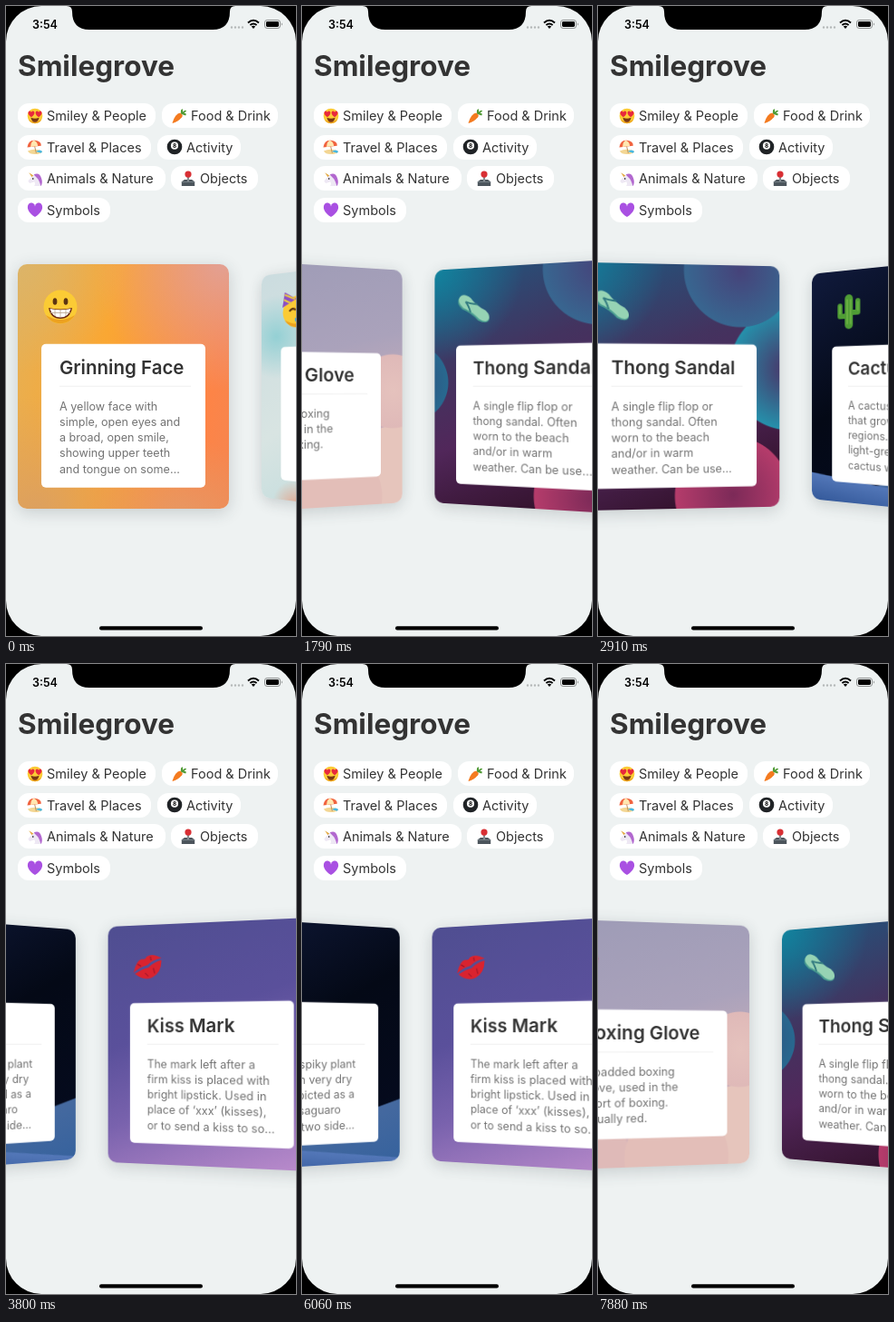
Write an HTML page that moves like this. It is 320 px wide and 693 px high and loops after 7990 ms.

```html
<!DOCTYPE html>
<html lang="en">
<head>
<meta charset="utf-8">
<title>Card carousel</title>
<style>
  html, body { margin: 0; width: 100%; height: 100%; overflow: hidden; background: #eef2f2; }
  body { position: relative; font-family: Inter, "Open Sans", sans-serif; color: #333; }
  h1 { position: absolute; left: 13px; top: 46.5px; margin: 0; font-size: 31.5px; line-height: 38px; font-weight: 700; }
  .chip { position: absolute; height: 27px; border-radius: 12px; background: #fff; font-size: 14.5px; line-height: 27px; white-space: nowrap; }
  .chip svg { position: absolute; left: 9.5px; top: 4.5px; width: 18px; height: 18px; }
  .chip span { position: absolute; left: 32px; }
  .card { position: absolute; left: 13px; top: 284px; width: 233px; height: 269px; border-radius: 10px; box-shadow: 0 4px 18px rgba(40, 55, 60, .2); }
  .card > svg { position: absolute; left: 27px; top: 27px; width: 40px; height: 40px; overflow: visible; }
  .box { position: absolute; left: 26px; top: 166.5px; width: 181px; min-height: 141px; transform: translateY(-50%);
    box-sizing: border-box; padding: 14px 16px 12px 20px; background: #fff; border-radius: 5px; }
  h2 { margin: 0; padding-bottom: 8px; border-bottom: 1px solid #efefef; font-size: 20.5px; line-height: 24px; font-weight: 600; white-space: nowrap; }
  p { margin: 13px 0 0; font-size: 12.6px; line-height: 17.3px; color: #737373; white-space: pre; }
  #phone { position: absolute; left: 0; top: 0; }
</style>
</head>
<body>
<h1>Smilegrove</h1>
<div id="chips"></div>
<div id="cards"></div>
<svg id="phone" width="320" height="693" viewBox="0 0 320 693">
  <path fill-rule="evenodd" d="M0 0H320V693H0Z M39 0H67Q73 0 73 6Q73 26 92 26H228Q247 26 247 6Q247 0 253 0H281A39 39 0 0 1 320 39V654A39 39 0 0 1 281 693H39A39 39 0 0 1 0 654V39A39 39 0 0 1 39 0Z"/>
  <text x="29" y="25" font-size="12.5" font-weight="600">3:54</text>
  <path d="M249 23.5H263" stroke="#b4b8b8" stroke-width="2.4" stroke-linecap="round" stroke-dasharray="0 4"/>
  <path d="M267 18.5Q273 13 279 18.5M269.4 21Q273 18 276.6 21" fill="none" stroke="#000" stroke-width="2"/>
  <path d="M270.8 22.6Q273 20.8 275.2 22.6L273 25Z"/>
  <rect x="285.5" y="15.5" width="17" height="9" rx="2.6" fill="none" stroke="#8d9090"/>
  <rect x="287" y="17" width="14" height="6" rx="1.4"/>
  <path d="M304 18.5Q306 20 304 21.5Z" fill="#8d9090"/>
  <rect x="103" y="682.3" width="114" height="4.2" rx="2.1"/>
</svg>
<script>
const face = '<circle cx="20" cy="20" r="18.5" fill="#fbcb35"/><path d="M4 29A18.5 18.5 0 0 0 36 29Q20 39 4 29" fill="#eda21f"/>';
const heart = (x, y, s, color) =>
  `<path transform="translate(${x} ${y}) scale(${s})" fill="${color}" d="M0 9C-14 0-9-10-3-8Q0-7 0-4Q0-7 3-8C9-10 14 0 0 9"/>`;

const art = {
  love: face + heart(11, 15, .85, '#e8283c') + heart(29, 15, .85, '#e8283c') + '<path d="M10 24Q20 28 30 24Q28 35 20 35T10 24" fill="#7a3713"/>',
  carrot: '<path d="M3 38Q10 14 23 12Q31 17 27 23Q18 34 3 38" fill="#f47b20"/><path d="M25 15Q22 4 29 3L29 10Q36 3 38 8L32 13Q40 13 36 19Z" fill="#4f9a35"/>',
  beach: '<path d="M2 30Q20 22 38 31Q34 38 20 38T2 30" fill="#f3d693"/><path d="M23 35L17 9" stroke="#b98954" stroke-width="2"/><path d="M1 21Q4 2 20 4T35 17Z" fill="#f0633f"/><path d="M9 20Q10 7 17 4Q26 7 27 18Z" fill="#ffe7b0"/><path d="M22 31Q32 24 38 31L35 35Z" fill="#45b8e4"/>',
  ball: '<circle cx="20" cy="20" r="18.5" fill="#202326"/><circle cx="20" cy="17" r="9" fill="#fff"/><text x="20" y="22" font-size="14" font-weight="700" text-anchor="middle">8</text>',
  unicorn: '<path d="M5 5L17 13L13 17Z" fill="#e2a63a"/><path d="M15 13Q26 6 33 18Q37 27 36 38H18Q22 31 18 27L8 31Q2 28 4 24Z" fill="#eee8f4"/><path d="M17 10Q31 3 36 20Q40 31 34 38Q31 23 24 17Z" fill="#b268cf"/><circle cx="15" cy="20" r="1.8"/>',
  joystick: '<path d="M4 27L11 22H29L36 27V38H4Z" fill="#4c555c"/><path d="M20 27V12" stroke="#858d92" stroke-width="5"/><circle cx="20" cy="9" r="8" fill="#d82f34"/><path d="M4 28H36" stroke="#7b858b" stroke-width="2"/>',
  symbol: heart(20, 20, 2, '#a950e2'),
  grin: face + '<ellipse cx="14" cy="14" rx="2.4" ry="3.8" fill="#5c3512"/><ellipse cx="26" cy="14" rx="2.4" ry="3.8" fill="#5c3512"/><path d="M7 21Q20 24 33 21Q31 33 20 33T7 21" fill="#6b2a15"/><path d="M8.5 22Q20 24.5 31.5 22Q29 31.5 20 31.5T8.5 22" fill="#fff"/><path d="M9 26.5H31M14 23V30M20 23V31M26 23V30" stroke="#b9a48f" stroke-width=".8"/>',
  party: face + '<path d="M1 14L4-4L19 5Z" fill="#8d4fc4"/><path d="M3 5L13 10M4-1L17 5" stroke="#e7c746" stroke-width="2"/><path d="M10 19Q14 14 18 18M24 16Q28 12 31 16" fill="none" stroke="#5c3512" stroke-width="2.4"/><path d="M17 27L37 32L35 37L17 31Z" fill="#48a9d8"/>',
  glove: '<path d="M9 25Q-2 12 11 4Q27-3 35 9Q39 19 30 28L26 31L10 29Z" fill="#da2b34"/><path d="M19 10Q25 19 34 13" fill="none" stroke="#981824" stroke-width="2"/><path d="M10 28L28 31L26 38L9 35Z" fill="#ab1c2b"/>',
  sandal: '<g transform="rotate(38 20 20)"><path d="M-2 20Q-2 13 9 13Q20 16 32 14Q42 15 42 20T32 27Q20 25 9 28Q-2 27-2 20" fill="#4b9e91"/><path d="M-2 19Q-2 12 9 12Q20 15 32 13Q41 14 41 19T32 25Q20 23 9 26Q-2 25-2 19" fill="#96d3b4"/><path d="M20 13Q12 18 7 19Q12 20 19 25" fill="none" stroke="#347c81" stroke-width="2"/></g>',
  cactus: '<g fill="none" stroke="#4f9d35" stroke-linecap="round" stroke-linejoin="round"><path d="M20 36V6" stroke-width="10"/><path d="M20 26H9V14M20 22H31V9" stroke-width="6"/><path d="M18 35V7M22 35V7M9 23V14M31 20V10" stroke="#83c052" stroke-width="1"/></g>',
  kiss: '<g transform="rotate(-24 20 20)" fill="#d9232f"><path d="M2 19Q11 7 17 9Q20 12 23 9Q31 8 38 18Q28 15 20 18Q11 16 2 19"/><path d="M3 21Q12 19 20 21Q29 18 37 20Q31 33 20 33T3 21"/><path d="M10 12L13 16M27 11L26 15M14 25L16 30M25 24L24 30" stroke="#96142a"/></g>'
};
const svg = name => `<svg viewBox="0 0 40 40">${art[name]}</svg>`;

// x, y, width, drawing, label
chips.innerHTML = [
  [13, 107, 152, 'love', 'Smiley &amp; People'], [172, 107, 128, 'carrot', 'Food &amp; Drink'],
  [13, 141.5, 147, 'beach', 'Travel &amp; Places'], [167, 141.5, 92, 'ball', 'Activity'],
  [13, 176, 163, 'unicorn', 'Animals &amp; Nature'], [182, 176, 96, 'joystick', 'Objects'],
  [13, 210.5, 102, 'symbol', 'Symbols']
].map(([x, y, w, icon, label]) =>
  `<div class="chip" style="left:${x}px;top:${y}px;width:${w}px">${svg(icon)}<span>${label}</span></div>`).join('');

const disc = (x, y, r, from, to) =>
  `radial-gradient(circle at ${x}px ${y}px, ${from} 0, ${to} ${r}px, transparent ${r + 1}px)`;
const blur = (x, y, r, color) => `radial-gradient(circle at ${x}px ${y}px, ${color}, transparent ${r}px)`;

const items = [
  { icon: 'grin', title: 'Grinning Face', text: 'A yellow face with\nsimple, open eyes and\na broad, open smile,\nshowing upper teeth\nand tongue on some…',
    bg: [blur(225, 0, 140, '#e3a092'), blur(0, 0, 120, '#dcb468'), blur(20, 275, 130, '#dca060'), blur(180, 290, 100, '#e39a68'), 'linear-gradient(100deg, #e6b055, #faa733 40%, #fd8447 85%, #f58650)'] },
  { icon: 'party', title: 'Partying Face', text: 'A yellow face with a\nparty hat, blowing a\nparty horn, as confetti\nfloats around its head.\nUsed to celebrate…',
    bg: [blur(20, 75, 50, '#94d0d4'), blur(190, 40, 80, '#9fd3d5'), blur(45, 275, 30, '#e4a78f'), 'linear-gradient(150deg, #cbdcdf, #d8e4e2 50%, #b6d8da)'] },
  { icon: 'glove', title: 'Boxing Glove', text: 'A padded boxing\nglove, used in the\nsport of boxing.\nUsually red.',
    bg: [disc(222, 140, 42, '#e5c2bd', '#dfb9b8'), disc(150, 260, 58, '#e3beb8', '#e3beb8'), disc(225, 235, 55, '#e6c5bc', '#e6c5bc'), disc(30, 255, 65, '#dfbab8', '#dfbab8'), 'linear-gradient(165deg, #9d9bb6, #aaa2bb 40%, #d3b2b9 75%, #e0bcb8)'] },
  { icon: 'sandal', title: 'Thong Sandal', text: 'A single flip flop or\nthong sandal. Often\nworn to the beach\nand/or in warm\nweather. Can be use…',
    bg: [disc(188, 6, 62, '#46437a', '#386690'), disc(180, 255, 64, '#7c2a58', '#b53c6b'), disc(245, 115, 68, '#4b2e63', '#2590ab'), disc(-28, 130, 44, '#30507e', '#28688f'), blur(0, 0, 105, '#12839e'), 'linear-gradient(160deg, #20567e, #43335f 36%, #51275a 60%, #35132f 88%)'] },
  { icon: 'cactus', title: 'Cactus', text: 'A cactus, a spiky plant\nthat grows in very dry\nregions. Depicted as a\nlight-green saguaro\ncactus with two side…',
    bg: ['linear-gradient(187deg, transparent 89%, #5377b8 89.4%, #34599a)', 'linear-gradient(162deg, transparent 79%, #45699f 79.5%, #36629d)', 'linear-gradient(150deg, #101a3c, #040916 45%, #050b20)'] },
  { icon: 'kiss', title: 'Kiss Mark', text: 'The mark left after a\nfirm kiss is placed with\nbright lipstick. Used in\nplace of ‘xxx’ (kisses),\nor to send a kiss to so…',
    bg: ['linear-gradient(160deg, #4f4e91, #5a509b 40%, #7962ad 65%, #bd8dcd)'] },
  { bg: ['linear-gradient(165deg, #43a7b5, #66bdc2 35%, #36a5b6 70%, #239bb2)'] }
];
cards.innerHTML = items.map(({ icon, title = '', text = '', bg }) =>
  `<div class="card" style="background:${bg.join()}">${icon ? svg(icon) : ''}` +
  `<div class="box">${title && `<h2>${title}</h2><p>${text}</p>`}</div></div>`).join('');

// Scroll position in cards: [time, position, resting point the fling decays towards]
const LOOP = 7990, PITCH = 256.3;
const scroll = [
  [930, 0], [1790, 2.502, 3], [2845, 2.985, 3], [2910, 3.167, 5], [4730, 4.93, 5], [5930, 4.999, 5],
  [6060, 4.517, 2], [6930, 2.985, 2], [7880, 2.294, 2], [LOOP, 2.26, 2]
];
function positionAt(time) {
  const next = scroll.findIndex(([end]) => time < end);
  if (next === 0) return 0;
  const [start, from] = scroll[next - 1], [end, to, rest] = scroll[next];
  return rest + (from - rest) * ((to - rest) / (from - rest)) ** ((time - start) / (end - start));
}

function draw() {
  const position = positionAt(performance.now() % LOOP);
  [...cards.children].forEach((card, i) => {
    const offset = i - position;
    card.style.display = Math.abs(offset) < 1.7 ? '' : 'none';
    card.style.transform = `translateX(${offset * PITCH}px) perspective(193px) rotateY(${-10 * offset}deg)`;
  });
  requestAnimationFrame(draw);
}
draw();
</script>
</body>
</html>
```
